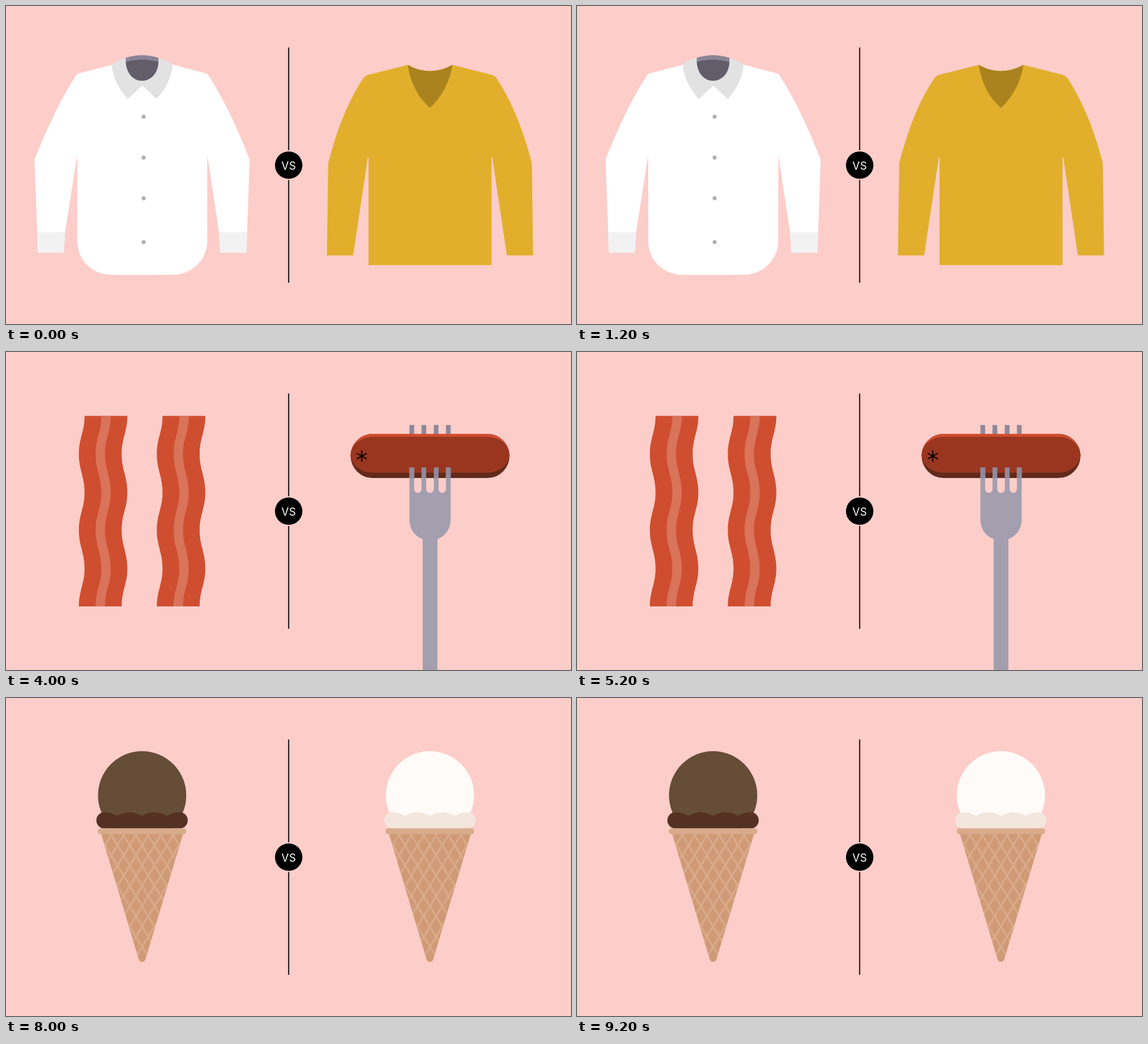
Write an HTML page that moves like this. It is 960 px wide and 540 px high and loops after 10000 ms.

```html
<!DOCTYPE html>
<html lang="en">
<head>
<meta charset="utf-8">
<title>This or that</title>
<style>
  html, body { margin: 0; width: 100%; height: 100%; overflow: hidden; background: #fdcdc9; }
  svg { display: block; width: 960px; height: 540px; }
  .scene { opacity: 0; animation: show 10s step-end infinite; animation-delay: calc(var(--i) * 2s - 10s); }
  @keyframes show { 0% { opacity: 1; } 20%, 100% { opacity: 0; } }
  .vs { font: 18px Inter, "Liberation Sans", sans-serif; letter-spacing: .6px; fill: #fff; text-anchor: middle; }
  .lace { fill: none; stroke: #fff; stroke-width: 5; stroke-linecap: round; stroke-linejoin: round; }
  .dark { fill: #35624b; }
  .mid { fill: #478263; }
  .light { fill: #6a9b82; }
  .vein { stroke: #fff; stroke-opacity: .33; stroke-width: 1.3; }
</style>
</head>
<body>
<svg viewBox="0 0 960 540">
  <defs>
    <path id="upper" d="M231.5 78.5C191 78.5 159.5 139 159.5 213C159.5 255 168 285 171 322L174.5 405C174.5 442 200 467 231.5 467S288 442 288.5 405L292 322C295 285 304 255 304 213C304 139 272 78.5 231.5 78.5Z"/>
    <path id="flip" d="M710 77C770 77 809 148 809 214C809 260 793 295 790.5 345L786.5 418C783 455 757 477 724 477C690 477 663 455 660.5 417L657 345C654 300 632 260 632 190C632 125 660 77 710 77Z"/>
    <path id="cone" d="M161.5 230H301L237 443.500Q235.500 448 231.300 448Q227 448 225.500 443.500Z"/>
    <clipPath id="upperClip"><use href="#upper"/></clipPath>
    <clipPath id="coneClip"><use href="#cone"/></clipPath>
    <clipPath id="topHalf"><rect x="580" y="130" width="280" height="46"/></clipPath>
    <pattern id="dots" x="680" y="78" width="11.7" height="20.3" patternUnits="userSpaceOnUse" fill="#3063a8">
      <circle cx="2.95" cy="5.1" r="2.9"/>
      <circle cx="8.8" cy="15.2" r="2.9"/>
    </pattern>
    <g id="leaf">
      <path d="M0 0C-20 -10 -34 -25 -35 -50C-35 -64 -40 -72 -40 -89C-40 -111 -23 -127 0 -127S38 -111 38 -88C38 -72 33 -64 33 -50C33 -25 20 -10 0 0Z"/>
      <path class="vein" d="M0 -8V-120"/>
    </g>
    <g id="half">
      <path fill="#ff7867" d="M-29 0H29A29 29 0 0 1 -29 0Z"/>
      <path fill="#ff5b48" d="M-24.500 2.200H24.500A24.600 24.600 0 0 1 -24.500 2.200Z"/>
      <g id="seeds" fill="#ffa08f"></g>
    </g>
    <g id="icecream">
      <circle cx="231.3" cy="165.3" r="75" fill="var(--scoop)"/>
      <path fill="var(--skirt)" d="M167 194C175 194 182 196 189 200Q210 188 231 200Q252 188 273.500 200C281 196 287 194 295.300 194a13.500 13.700 0 0 1 0 27.400H167a13.500 13.700 0 0 1 0 -27.400Z"/>
      <use href="#cone" fill="#cf9a75"/>
      <path id="lattice" clip-path="url(#coneClip)" stroke="#d9ab8c" stroke-width="3.2"/>
      <rect x="156" y="221.200" width="150.500" height="10.300" rx="5.100" fill="#d8ab8d"/>
    </g>
  </defs>

  <rect width="960" height="540" fill="#fdcdc9"/>

  <!-- shirt and sweater -->
  <g class="scene" style="--i:0">
    <path fill="#fff" d="M121 115L181 99.500H283L342 115C367 152 392 204 414 261L408.500 419H364L362 384L342 253V398C342 432 315 456.500 283 456.500H180C147 456.500 121 432 121 398V253L100.500 384L98 419H54L53 384L48.500 261C71 204 96 152 121 115Z"/>
    <path fill="#f2f2f3" d="M53 384H100.500L98 419H54ZM362 384H410L408.500 419H364.500Z"/>
    <path fill="#e2e2e2" d="M204 88C190 92 180 97 180 102C181 120 193 143 207 158L231.500 135L256 158C270 143 281 122 283 102C282 97 273 92 259 88Z"/>
    <path fill="#625d69" d="M203.500 94Q231 87 259 94C259 114 246 127 231 127S204 114 203.500 94Z"/>
    <path fill="#8a8494" d="M203.500 88Q231 79 259 88V95Q231 87 203.500 95Z"/>
    <g fill="#b1b1b1">
      <circle cx="233.8" cy="188" r="3.4"/>
      <circle cx="233.8" cy="257.500" r="3.4"/>
      <circle cx="233.8" cy="326.500" r="3.4"/>
      <circle cx="233.8" cy="401" r="3.4"/>
    </g>
    <path fill="#e1af2c" d="M682.500 100L615 117Q610 118.500 606.500 123.500C580 163 561 214 547.500 267L545.300 423.500H589.800L614.800 257L616 258V440H825V257L826.200 257L851 423.500H895.500L893.500 267C880 214 860 163 833.500 122.500Q830.500 118.500 825.500 117L758.500 100Q720 121 682.500 100Z"/>
    <path fill="#aa831f" d="M682.500 100Q720 121 758.500 100C754 129 741 154 720.300 173C699 154 687 129 682.500 100Z"/>
  </g>

  <!-- sneaker and sandal -->
  <g class="scene" style="--i:1">
    <path fill="#fff" d="M231.500 67.500C185 67.500 151 130 151 208C151 257 164 289 170.500 325L174.500 412C177 447 200 472.500 231.500 472.500S286 447 288.500 412L292.500 325C299 289 312 257 312 208C312 130 278 67.500 231.500 67.500Z"/>
    <use href="#upper" fill="#e1af2c"/>
    <path clip-path="url(#upperClip)" fill="#fff" d="M150 70H310V141L293 143.500Q231 152 170 143.500L150 141Z"/>
    <path fill="none" stroke="#cf4e2f" stroke-width="2.6" d="M171 322C168 285 159.500 255 159.500 213C159.500 139 191 78.500 231.500 78.500S304 139 304 213C304 255 295 285 292 322"/>
    <path fill="#735a12" d="M185 383C185 362 198 349 218 349H245C264 349 278 362 277.500 383L276.500 410C276 437 255 456 231.500 456C206 456 187 437 186.500 410Z"/>
    <path id="laces" class="lace"/>
    <use href="#flip" fill="#1c519b"/>
    <use href="#flip" fill="url(#dots)"/>
    <rect x="698" y="123" width="15.300" height="40" rx="7.600" fill="#7996ca"/>
    <path fill="none" stroke="#a6b9d9" stroke-width="19.5" stroke-linecap="round" d="M651.500 312C655 240 676 160.500 709 160.500C746 160.500 772 220 795 312"/>
  </g>

  <!-- bacon and sausage -->
  <g class="scene" style="--i:2">
    <g id="bacon">
      <path id="meat" fill="#cf4e2f"/>
      <path id="fat" fill="#d9735a"/>
    </g>
    <use href="#bacon" x="132.500"/>
    <path stroke="#8f8899" stroke-width="8" d="M689.500 124V160M710 124V160M730.800 124V160M751.500 124V160"/>
    <rect x="585.500" y="139" width="270" height="75" rx="37.500" fill="#622a1b"/>
    <rect x="585.500" y="139" width="270" height="75" rx="37.500" fill="#cf4e2f" clip-path="url(#topHalf)"/>
    <rect x="585.500" y="144" width="270" height="61" rx="38" ry="30.500" fill="#9a3620"/>
    <path stroke="#000" stroke-width="1.9" d="M604.500 167V186.500M596 172L613 181.600M613 172L596 181.600"/>
    <path fill="#a39fae" d="M685.500 196V284C685.500 301 695 313 708 317.500V540H733V317.500C746 313 755.500 301 755.500 284V196H747.500V233a6.200 6.200 0 0 1 -12.500 0V196H727V233a6.400 6.200 0 0 1 -13 0V196H706V233a6.200 6.200 0 0 1 -12.500 0V196Z"/>
    <path stroke="#91889a" stroke-width="8" d="M689.500 196V214M710 196V214M731 196V214M751.500 196V214"/>
  </g>

  <!-- pizza and salad -->
  <g class="scene" style="--i:3">
    <g transform="translate(231.300 270)">
      <circle r="157.500" fill="#dfb898"/>
      <path stroke="#cda083" stroke-width="1.500" d="M0 -157.500V157.500M-136.400 -78.700L136.400 78.700M-136.400 78.700L136.400 -78.700"/>
      <circle r="140" fill="#ff5b48"/>
      <path fill="#fff2df" d="M-131.500 0C-131.500 -30 -123 -58 -112 -75S-88 -90 -73 -102S-56 -127 -38 -127.500S-14 -125 0 -125S22 -128 38 -127.500S58 -115 73 -102S103 -90 112 -75S131.500 -30 131.500 0S123 58 112 75S88 90 73 102S56 127 38 127.500S14 125 0 125S-22 128 -38 127.500S-58 115 -73 102S-103 90 -112 75S-131.500 30 -131.500 0Z"/>
    </g>
    <g id="toppings"></g>
    <path transform="translate(231.300 270)" stroke="#ea4030" stroke-opacity=".65" stroke-width="1.500" d="M0 -140V140M-121.200 -70L121.200 70M-121.200 70L121.200 -70"/>
    <circle cx="720.500" cy="270" r="157.500" fill="#fff"/>
    <circle cx="720.500" cy="270" r="137.500" fill="#ece7ea"/>
    <g id="salad"></g>
  </g>

  <!-- ice creams -->
  <g class="scene" style="--i:4">
    <use href="#icecream" style="--scoop:#654d37;--skirt:#553124"/>
    <use href="#icecream" x="489" style="--scoop:#fffbf8;--skirt:#f3e6dd"/>
  </g>

  <path stroke="#000" stroke-width="1.800" d="M480.300 70.500V245M480.300 295.500V470"/>
  <circle cx="480.300" cy="270.300" r="23.300"/>
  <text class="vs" x="480.600" y="277.700">VS</text>
</svg>
<script>
  const byId = id => document.getElementById(id);
  const setPath = (id, d) => byId(id).setAttribute('d', d);
  const place = (x, y, turn) => `transform="translate(${x} ${y}) rotate(${turn})"`;

  // Laces: two mirrored zigzags under one top bar
  const zigzag = (a, b) => 'M' + [...Array(7)].map((_, i) => `${i % 2 ? b : a} ${181.5 + 24 * i}`).join('L');
  setPath('laces', 'M198 181.500Q231 178.500 265 181.500' + zigzag(198, 265) + zigzag(265, 198));

  // Bacon: a strip of width w with two parallel wavy edges
  function strip(x, w) {
    const edge = dir => [...Array(5)].map((_, i) => {
      const dx = (i % 2 ? 9.7 : -9.7) * dir;
      return `c0 ${27 * dir} ${dx} ${37.7 * dir} ${dx} ${64.7 * dir}`;
    }).join('');
    return `M${x} 108.500${edge(1)}h${w}${edge(-1)}Z`;
  }
  setPath('meat', strip(133.5, 72.7));
  setPath('fat', strip(162, 16));

  // Pizza
  const pepperoni = [[222.3, 171], [273, 211], [201.5, 229], [141, 250], [328, 266.5],
    [264, 296], [174, 312], [292.3, 352.5], [203.6, 365]];
  const herbs = [[170.5, 195, 8], [275.5, 174, 2], [321, 220, 60], [247, 241, 60], [289.3, 261.3, 53],
    [183, 270, -20], [127.5, 292.3, 65], [211, 321, 90], [153, 342.3, 15], [255.7, 364, -60], [307, 319.5, -40]];
  byId('toppings').innerHTML =
    pepperoni.map(([x, y]) => `<circle cx="${x}" cy="${y}" r="16.500" fill="#cf4e2f"/>`).join('') +
    herbs.map(([x, y, a]) => `<rect x="-9.500" y="-3" width="19" height="6" fill="#468265" ${place(x, y, a)}/>`).join('');

  // Salad: leaves from bottom to top, then tomato halves
  byId('seeds').innerHTML = [18, 54, 90, 126, 162]
    .map(a => `<ellipse cx="15.500" rx="4.200" ry="1.900" transform="translate(0 1.500) rotate(${a})"/>`).join('');
  const leaves = [['dark', 72, 144, 252], ['light', 36, 288, 180], ['dark', 0], ['mid', 324, 216, 108]];
  const tomatoes = [[713.5, 207.3, 135], [785.5, 221.5, 50.5], [719, 263.3, -35], [708.3, 332.7, 27.5],
    [652.5, 269, 60.5], [652.5, 269, 240.5], [788.3, 306.3, -62.4], [788.3, 306.3, 117.6]];
  byId('salad').innerHTML =
    leaves.map(([tone, ...turns]) =>
      turns.map(a => `<use href="#leaf" class="${tone}" ${place(720.5, 270, a)}/>`).join('')).join('') +
    tomatoes.map(t => `<use href="#half" ${place(...t)}/>`).join('');

  // Waffle: two families of slanted lines
  let waffle = '';
  for (let k = -9; k <= 9; k++) {
    for (const s of [-1, 1]) {
      const x = y => 231.3 + 21 * k + s * (y - 388) * 21 / 34.5;
      waffle += `M${x(225)} 225L${x(452)} 452`;
    }
  }
  setPath('lattice', waffle);
</script>
</body>
</html>
```
